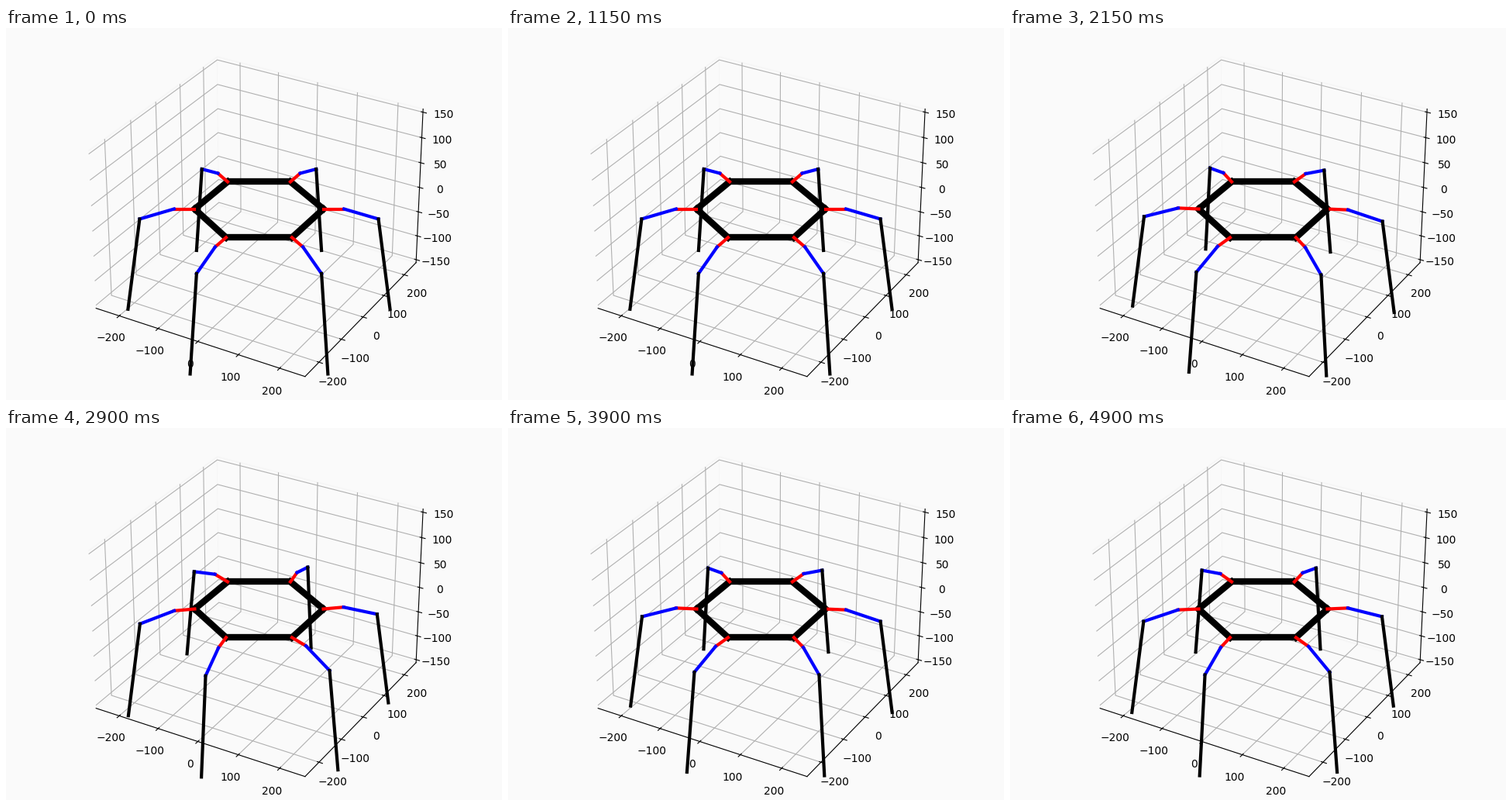
A matplotlib script that plays this animation: 640 px wide and 480 px high, repeating every 5 s.

```python
import numpy as np
import matplotlib.pyplot as plt
from matplotlib.animation import FuncAnimation

BACKGROUND = "#fafafa"
FRAME_MS = 50
LOOP_MS = 5000
STEP_MS = 250
START_MS = 150
SWING = [0, 1, 2, 1, 0, 0, -1, -2, -1]  # in units of SWING_ANGLE
SWING_ANGLE = np.radians(5)

BODY_RADIUS = 140
COXA = 45
FEMUR, FEMUR_TILT = 78.2, np.radians(-15)
TIBIA, TIBIA_TILT = 190, np.radians(-80)
LINK_COLORS = ["red", "blue", "black"]
HIPS = np.radians(np.arange(30, 390, 60))

# Distance from the hip and height of hip, coxa end, knee and foot
REACH = np.cumsum([0, COXA, FEMUR * np.cos(FEMUR_TILT), TIBIA * np.cos(TIBIA_TILT)])
HEIGHT = np.cumsum([0, 0, FEMUR * np.sin(FEMUR_TILT), TIBIA * np.sin(TIBIA_TILT)])


def leg_points(hip, swing):
    x = BODY_RADIUS * np.cos(hip) + REACH * np.cos(hip + swing)
    y = BODY_RADIUS * np.sin(hip) + REACH * np.sin(hip + swing)
    return np.array([x, y, HEIGHT])


def swing_at(ms):
    step = max(ms - START_MS, 0) // STEP_MS
    return SWING[step % len(SWING)] * SWING_ANGLE


def padded(half_range):
    """Symmetric limits with a small margin beyond the data range."""
    limit = half_range * 25 / 24
    return -limit, limit


fig = plt.figure(figsize=(6.4, 4.8), dpi=100, facecolor=BACKGROUND)
ax = fig.add_axes([0, 0, 1, 1], projection="3d", facecolor=BACKGROUND)
ax.view_init(elev=30, azim=-60)
for axis in (ax.xaxis, ax.yaxis, ax.zaxis):
    axis.pane.set(facecolor=BACKGROUND, edgecolor="0.96", alpha=None)

for a, b in zip(HIPS, np.roll(HIPS, -1)):
    ends = np.array([a, b])
    ax.plot(BODY_RADIUS * np.cos(ends), BODY_RADIUS * np.sin(ends), [0, 0],
            color="black", lw=6)

legs = [[ax.plot([0, 0], [0, 0], [0, 0], color=color, lw=3)[0]
         for color in LINK_COLORS] for _ in HIPS]

ax.set_xticks(range(-200, 201, 100))
ax.set_yticks(range(-200, 201, 100))
ax.set_zticks(range(-150, 151, 50))
ax.set(xlim=padded(250), ylim=padded(250), zlim=padded(150))


def update(frame):
    swing = swing_at(frame * FRAME_MS)
    for hip, links in zip(HIPS, legs):
        points = leg_points(hip, swing)
        for i, link in enumerate(links):
            link.set_data_3d(*points[:, i:i + 2])
    return [link for links in legs for link in links]


anim = FuncAnimation(fig, update, frames=LOOP_MS // FRAME_MS, interval=FRAME_MS,
                     repeat=True, repeat_delay=0)
plt.show()
```
